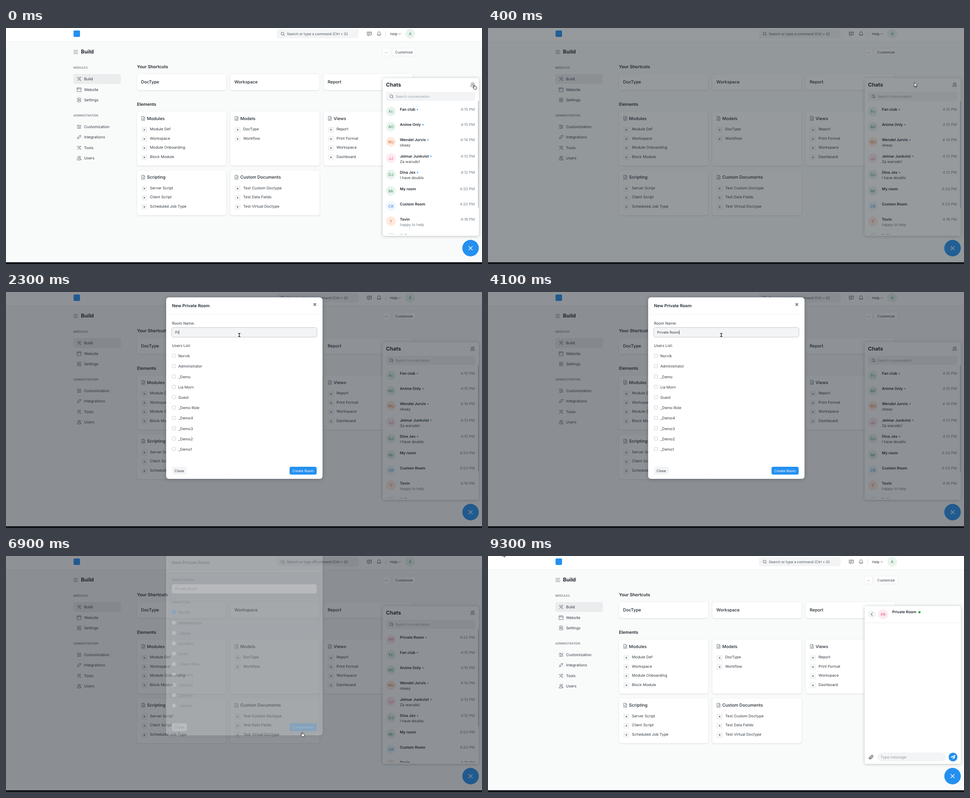
Recreate the animation shown at these times as an HTML page with a canvas. Size 1061x528 px, loop 9.4 s.

```html
<!DOCTYPE html>
<html lang="en">
<head>
<meta charset="utf-8">
<title>Creating a private room</title>
<style>
html, body { margin: 0; width: 100%; height: 100%; overflow: hidden; }
canvas { display: block; }
</style>
</head>
<body>
<canvas id="stage" width="1061" height="528"></canvas>
<script>
const ctx = document.getElementById('stage').getContext('2d');
const LOOP = 9400, STEP = 100;
const INK = '#1f272e', BODY = '#333c44', MUTED = '#74808b', LINE = '#e6e9ec', SOFT = '#f3f4f5', BLUE = '#2490ef';
const TINTS = {
  green: ['#e9f3ed', '#2f9058'], orange: ['#ffe9de', '#cf6330'],
  pink: ['#fdeaf2', '#e2558b'], blue: ['#edf6fd', '#318ad8']
};
const clamp = v => Math.max(0, Math.min(1, v));

// y is the middle of the capital letters
function text(str, x, y, { size = 8.4, color = BODY, weight = 400, align = 'left' } = {}) {
  ctx.font = `${weight} ${size}px Inter, sans-serif`;
  ctx.textAlign = align;
  ctx.fillStyle = color;
  ctx.fillText(str, x, y + size * 0.364);
  return ctx.measureText(str).width;
}

function box(x, y, w, h, r, fill, stroke) {
  ctx.beginPath();
  ctx.roundRect(x, y, w, h, r);
  if (fill) { ctx.fillStyle = fill; ctx.fill(); }
  if (stroke) { ctx.strokeStyle = stroke; ctx.lineWidth = 0.8; ctx.stroke(); }
}

function card(x, y, w, h, r = 5, blur = 3, alpha = 0.16) {
  ctx.save();
  ctx.shadowColor = `rgba(25,39,52,${alpha})`;
  ctx.shadowBlur = blur;
  ctx.shadowOffsetY = 0.7;
  box(x, y, w, h, r, '#fff');
  ctx.restore();
}

const disc = (x, y, r, fill) => box(x - r, y - r, 2 * r, 2 * r, r, fill);

function icon(path, x, y, color = '#4c5a67', width = 0.8, fill) {
  ctx.save();
  ctx.translate(x, y);
  ctx.lineCap = ctx.lineJoin = 'round';
  const shape = new Path2D(path);
  if (fill) { ctx.fillStyle = fill; ctx.fill(shape); }
  ctx.strokeStyle = color;
  ctx.lineWidth = width;
  if (width) ctx.stroke(shape);
  ctx.restore();
}

function avatar(label, x, y, r, tint) {
  disc(x, y, r, TINTS[tint][0]);
  text(label, x, y + 0.3, { color: TINTS[tint][1], align: 'center', size: 8.6 });
}

const ICONS = {
  search: 'M3-.5A3.2 3.2 0 1 1-3.4-.5A3.2 3.2 0 1 1 3-.5M2 2L4.2 4.2',
  people: 'M1-2A2 2 0 1 1-3-2A2 2 0 1 1 1-2M-4.3 4V2.7Q-4.2 1-2 1H0Q2.2 1 2.3 2.7V4ZM1.5-4.2A2 2 0 0 1 2.2-.3M3 1Q4.6 1.4 4.5 4H3.6',
  file: 'M-3.2-4.5H1L3.2-2.2V4.5H-3.2ZM1-4.5V-2.2H3.2M-1.5 0H1.5M-1.5 2.2H1.5',
  message: 'M-4.5-4H4.5V2.7H0L-2.4 4.6V2.7H-4.5ZM-2.4-1.8H2.4M-2.4.5H.6',
  bell: 'M-4 2.4Q-2.8 1-2.8-1Q-2.6-4.5 0-4.5Q2.6-4.5 2.8-1Q2.8 1 4 2.4ZM-1.2 3.8Q0 5.4 1.2 3.8',
  cross: 'M-4-4L4 4M4-4L-4 4',
  clip: 'M4-.7L-.4 3.7Q-2.6 5.3-4 3.7Q-5.3 2-3.8.4L1-4.2Q2.8-5.2 3.9-4Q4.9-2.7 3.7-1.4L-.8 3Q-2 3.6-2.6 2.7Q-3 2-2.2 1.2L1.7-2.6',
  plane: 'M5.5-5L-5.5 0L-2 1.4L3.8-3.5L-.6 2.2L3.2 3.9ZM-1.4 2.6L-1.2 5L.3 3.2Z'
};
const MENU = [
  ['Build', 114, 'M-4 4L2-2M-4-3L-2.5-4L4 3L3 4ZM.5-3.5Q2.5-5.2 4-3L2.7-2'],
  ['Website', 138, 'M-4.3-4.3H4.3V4.3H-4.3ZM-4.3-1.6H4.3M-2.6-3H-2.4M-.8-3H-.6'],
  ['Settings', 161, 'M-2-4.2H2.4A1.8 1.8 0 0 1 2.4-.6H-2.4A1.8 1.8 0 0 1-2-4.2M-2.4.7H2.4A1.8 1.8 0 0 1 2.4 4.3H-2.4A1.8 1.8 0 0 1-2.4.7M-2-2.4H-1.8M2 2.5H2.2'],
  ['Customization', 221, 'M-4.5-3.2H4.5M-4.5 0H4.5M-4.5 3.2H4.5M-2-4.2V-2.2M2-1V1M-1 2.2V4.2'],
  ['Integrations', 244, 'M-4.4 4.4L-2.2 2.2M-2.7-.5L.5 2.7Q-1.8 4.4-3 2.8Q-4.3 1-2.7-.5M2.2-2.2L4.4-4.4M-.5-2.7Q1.6-4.5 3-3Q4.3-1.4 2.7.5Z'],
  ['Tools', 268, 'M-4 4L2-2M-4-3L-2.5-4L4 3L3 4ZM.5-3.5Q2.5-5.2 4-3L2.7-2'],
  ['Users', 291, ICONS.people]
];
const CARDS = [
  [292, 187, 121, 'Modules', ['Module Def', 'Workspace', 'Module Onboarding', 'Block Module']],
  [500, 187, 121, 'Models', ['DocType', 'Workflow']],
  [708, 187, 121, 'Views', ['Report', 'Print Format', 'Workspace', 'Dashboard']],
  [292, 318.5, 100.5, 'Scripting', ['Server Script', 'Client Script', 'Scheduled Job Type']],
  [500, 318.5, 100.5, 'Custom Documents', ['Test Custom Doctype', 'Test Data Fields', 'Test Virtual Doctype']]
];
const NEW_CHAT = ['PR', 'Private Room', '', '4:22 PM', 'pink', true];
const CHATS = [
  ['Fc', 'Fan club', '', '4:15 PM', 'green', true],
  ['AO', 'Anime Only', '', '4:15 PM', 'green', true],
  ['WJ', 'Wendel Jurvis', 'okaay', '4:14 PM', 'orange', true],
  ['JJ', 'Jelmar Junkvist', 'Za warudo!', '4:13 PM', 'pink', true],
  ['DJ', 'Dina Jex', 'I have doubts', '4:12 PM', 'green', true],
  ['Mr', 'My room', '', '4:20 PM', 'green'],
  ['CR', 'Custom Room', '', '4:20 PM', 'blue'],
  ['T', 'Tovin', 'happy to help', '4:18 PM', 'orange'],
  ['', 'Hall', '', '', 'green']
];
const USERS = ['Norvik', 'Administrator', '_Demo', 'Lia Morn', 'Guest', '_Demo Role', '_Demo4', '_Demo3', '_Demo2', '_Demo1'];
const TYPED = [[0, ''], [1700, 'P'], [2300, 'Pr'], [2400, 'Pri'], [3100, 'Priva'], [3200, 'Private '],
  [3500, 'Private R'], [3800, 'Private Roo'], [4100, 'Private Room']];

function drawPage() {
  ctx.fillStyle = '#f9fafa';
  ctx.fillRect(0, 0, 1061, 528);
  ctx.fillStyle = '#fff';
  ctx.fillRect(0, 0, 1061, 30.5);
  ctx.fillStyle = '#e9ecee';
  ctx.fillRect(0, 30.5, 1061, 0.8);

  box(150.5, 5.5, 14.5, 14.5, 2.5, BLUE);
  box(604, 2.5, 182, 20.5, 4, SOFT);
  icon(ICONS.search, 616.5, 13, '#4c5a67', 0.9);
  text('Search or type a command (Ctrl + G)', 626, 13, { size: 7.8, color: '#505a62' });
  icon(ICONS.message, 810, 13, BODY);
  icon(ICONS.bell, 831.5, 12.7, BODY);
  ctx.fillStyle = '#d9dde0';
  ctx.fillRect(846, 6, 0.8, 13);
  text('Help', 856, 13, { size: 7.7 });
  icon('M-2.3-1L0 1.3L2.3-1', 877.5, 13);
  avatar('A', 901, 12.7, 10.7, 'green');

  icon('M-4.5-3.5H4.5M-4.5 0H4.5M-4.5 3.5H4.5', 155.5, 53.7);
  text('Build', 167, 53, { size: 11.7, weight: 700, color: INK });
  box(839, 45, 18, 17.5, 4, '#fff', LINE);
  for (const x of [845.5, 848, 850.5]) disc(x, 55, 0.6, BODY);
  box(861, 45, 52.5, 17.5, 4, '#fff', LINE);
  text('Customize', 887, 54, { size: 7.8, align: 'center' });

  text('MODULES', 150, 89, { size: 6.5, color: '#505a62' });
  text('ADMINISTRATION', 150, 195.5, { size: 6.5, color: '#505a62' });
  box(150, 103, 106, 22, 4, '#ebeced');
  for (const [label, y, path] of MENU) {
    icon(path, 163, y);
    text(label, 174, y);
  }

  const heading = { size: 9.65, weight: 600, color: INK };
  const title = { size: 9.6, weight: 500, color: INK };
  text('Your Shortcuts', 292, 86.5, heading);
  ['DocType', 'Workspace', 'Report'].forEach((label, i) => {
    card(292 + 208 * i, 103, 199, 36);
    text(label, 301 + 208 * i, 121, title);
  });
  text('Elements', 292, 170.7, heading);
  for (const [x, y, h, label, items] of CARDS) {
    card(x, y, 199, h);
    icon(ICONS.file, x + 14, y + 15.3, '#4c5a67', 0.75);
    text(label, x + 22.3, y + 15.2, title);
    items.forEach((item, i) => {
      const cy = y + 39.3 + 20.5 * i;
      box(x + 9.5, cy - 5, 13.5, 13, 2, SOFT);
      disc(x + 16.3, cy + 1.5, 1.2, BODY);
      text(item, x + 28.8, cy);
    });
  }
  ctx.fillStyle = '#11151a';
  ctx.fillRect(0, 524, 1061, 4);
}

function drawList(t) {
  const added = t >= 6800;
  text('Chats', 847, 127, { size: 11.7, weight: 700, color: INK });
  icon(ICONS.people, 1040, 126.5);
  box(847, 143, 199, 20, 4, SOFT);
  icon(ICONS.search, 859, 153, '#4c5a67', 0.9);
  text('Search conversation', 868.5, 153, { size: 7.8, color: '#99a1a8' });
  box(1052, 163, 1.8, added ? 219 : 239, 0.9, '#bfc3c7');

  ctx.save();
  ctx.beginPath();
  ctx.rect(839, 164, 213, 298);
  ctx.clip();
  let y = 182;
  for (const chat of added ? [NEW_CHAT, ...CHATS] : CHATS) {
    const [initials, name, message, time, tint, unread] = chat;
    avatar(initials, 858, y + 4.7, 10.7, tint);
    const w = text(name, 878, y, { weight: 600, color: INK });
    if (unread && !(chat === NEW_CHAT && t >= 7800)) disc(878 + w + 4.7, y + 0.4, 1.3, BLUE);
    text(time, 1045, y, { color: MUTED, align: 'right' });
    text(message, 878, y + 12.3, { color: unread ? BODY : MUTED });
    y += message ? 36.5 : 34;
  }
  ctx.restore();
}

function drawRoom() {
  disc(855.3, 130.5, 8.5, SOFT);
  icon('M1.5-3L-1.5 0L1.5 3', 855.3, 130.5, INK, 1);
  avatar('PR', 880.7, 130.5, 11, 'pink');
  text('Private Room', 901, 125.2, { weight: 600, color: INK });
  disc(961.7, 125.7, 2.5, '#28a745');
  ctx.fillStyle = LINE;
  ctx.fillRect(839, 149, 215, 0.8);
  icon(ICONS.clip, 854, 450, INK, 1);
  box(868, 439.5, 152, 20.5, 10, SOFT);
  text('Type message', 875, 450, { color: '#99a1a8' });
  disc(1036.5, 449.7, 9.8, BLUE);
  icon(ICONS.plane, 1036.3, 449.7, '#fff', 0, '#fff');
}

function drawChat(t) {
  card(839.5, 112, 214.5, 353, 4, 7, 0.28);
  if (t < 8000) drawList(t); else drawRoom();
  disc(1035.5, 492.5, 18.4, BLUE);
  icon(ICONS.cross, 1035.5, 492.5, '#fff', 1.2);
}

// cubic-bezier(0, 0, .58, 1)
function easeOut(x) {
  let lo = 0, hi = 1;
  for (let i = 0; i < 20; i++) {
    const p = (lo + hi) / 2;
    if (1.74 * p * p - 0.74 * p ** 3 < x) lo = p; else hi = p;
  }
  return lo * lo * (3 - 2 * lo);
}

function drawModal(t) {
  const opening = t < 6800;
  const alpha = opening ? clamp((t - 404) / 150) : 1 - clamp((t - 6834) / 88);
  if (alpha <= 0) return;
  const shown = opening ? easeOut(clamp((t - 404) / 300)) : 1 - easeOut(clamp((t - 6834) / 300));
  ctx.save();
  ctx.globalAlpha = alpha;
  ctx.translate(0, -50 * (1 - shown));
  card(357, 12, 348.5, 406, 6, 8, 0.3);
  text('New Private Room', 370, 31, { size: 9.5, weight: 600, color: INK });
  icon('M-2.2-2.2L2.2 2.2M2.2-2.2L-2.2 2.2', 688.3, 28, BODY, 1.5);
  ctx.fillStyle = '#eff1f2';
  ctx.fillRect(357, 50, 348.5, 0.8);

  text('Room Name:', 370, 69.7);
  const focused = t >= 1200 && t < 5400;
  if (focused) box(369.4, 79.4, 323.7, 21.6, 4.5, SOFT, '#b4bac0');
  else box(370, 80, 322.5, 20.5, 4, SOFT);
  const typed = TYPED.filter(([at]) => at <= t).pop()[1];
  const w = text(typed, 377, 90.3, { size: 7.8 });
  if (focused) {
    ctx.fillStyle = INK;
    ctx.fillRect(377 + w, 85.5, 0.8, 9.5);
  }

  text('Users List:', 370, 120);
  USERS.forEach((user, i) => {
    const y = 142.8 + 23.2 * i;
    const checked = i === 0 && t >= 5500;
    if (i === 0 && t >= 5400 && t < 6500) box(369.5, y - 4.9, 9.4, 9.4, 2.8, '#d3d8dc');
    box(370.4, y - 4, 7.6, 7.6, 2, checked ? BLUE : '#fff', checked ? BLUE : '#b9c0c6');
    if (checked) icon('M-2 0L-.6 1.5L2.1-1.5', 374.2, y - 0.2, '#fff', 1.1);
    text(user, 384, y + 0.4);
  });
  box(370, 391, 33, 17.5, 4, SOFT);
  text('Close', 386.3, 400, { size: 7.8, align: 'center' });
  box(632, 391, 60.5, 17.5, 4, BLUE);
  text('Create Room', 662.2, 400, { size: 7.8, align: 'center', color: '#fff' });
  ctx.restore();
}

// time, x, y and the pointer used until the next stop
const PATH = [
  [0, 1044, 127, 'hand'], [200, 1044, 127, 'hand'], [300, 1043, 127, 'arrow'], [400, 950, 122, 'arrow'],
  [500, 770, 114, 'arrow'], [600, 630, 111, 'arrow'], [800, 568, 106, 'arrow'], [1000, 530, 97, 'beam'],
  [1200, 520, 96, 'beam'], [4400, 520, 96, 'beam'], [4600, 440, 98, 'beam'], [4700, 360, 108, 'arrow'],
  [4900, 283, 128, 'arrow'], [5200, 360, 138, 'arrow'], [5400, 373, 139, 'arrow'], [5500, 373, 139, 'arrow'],
  [5800, 620, 325, 'arrow'], [5900, 670, 375, 'arrow'], [6000, 657, 382, 'arrow'], [6100, 657, 382, 'arrow'],
  [6200, 659, 390, 'hand'], [6300, 660, 394, 'hand'], [6900, 660, 394, 'hand'], [7000, 703, 374, 'arrow'],
  [7100, 769, 329, 'arrow'], [7300, 885, 236, 'arrow'], [7500, 940, 193, 'hand'], [8000, 940, 192, 'arrow'],
  [8300, 940, 192, 'arrow'], [8700, 640, 130, 'arrow'], [9100, 150, 22, 'arrow'], [9300, 33, -8.5, 'arrow'], [9400, 33, -8.5, 'arrow']
];
const POINTERS = {
  arrow: ['M0 0V9.8L2.3 7.8L3.7 11.2L5.2 10.6L3.8 7.3L6.8 7.1Z', 0.9],
  hand: ['M-1 .9Q0-.3 1 .9V4Q2 3.3 2.7 4.3Q3.7 3.6 4.2 4.7Q5.3 4.5 5.3 5.8Q5.2 8 4.2 10H-.6Q-1.8 8-3.2 6.3Q-3.2 5-2 5.4L-1 6.2Z', 0.9],
  beam: ['M-2-3.5Q0-3.5 0-2.5Q0-3.5 2-3.5M0-2.5V3M-2 3.8Q0 3.8 0 3Q0 3.8 2 3.8', 1.3]
};

function drawPointer(t) {
  const i = PATH.findIndex(stop => stop[0] > t);
  const [t0, x0, y0, kind] = PATH[i - 1], [t1, x1, y1] = PATH[i];
  const k = (t - t0) / (t1 - t0);
  const [path, width] = POINTERS[kind];
  icon(path, x0 + (x1 - x0) * k, y0 + (y1 - y0) * k, '#16191c', width, kind !== 'beam' && '#fff');
}

function draw(t) {
  ctx.textRendering = 'geometricPrecision';
  drawPage();
  drawChat(t);
  const dim = t < 6800 ? clamp((t - 260) / 150) : 1 - clamp((t - 6930) / 150);
  ctx.fillStyle = `rgba(31,39,46,${0.5 * dim})`;
  ctx.fillRect(0, 0, 1061, 524);
  drawModal(t);
  drawPointer(t);
}

const start = performance.now();
function tick() {
  const t = (performance.now() - start) % LOOP;
  draw(Math.floor(t / STEP) * STEP);
  requestAnimationFrame(tick);
}
tick();
</script>
</body>
</html>
```
